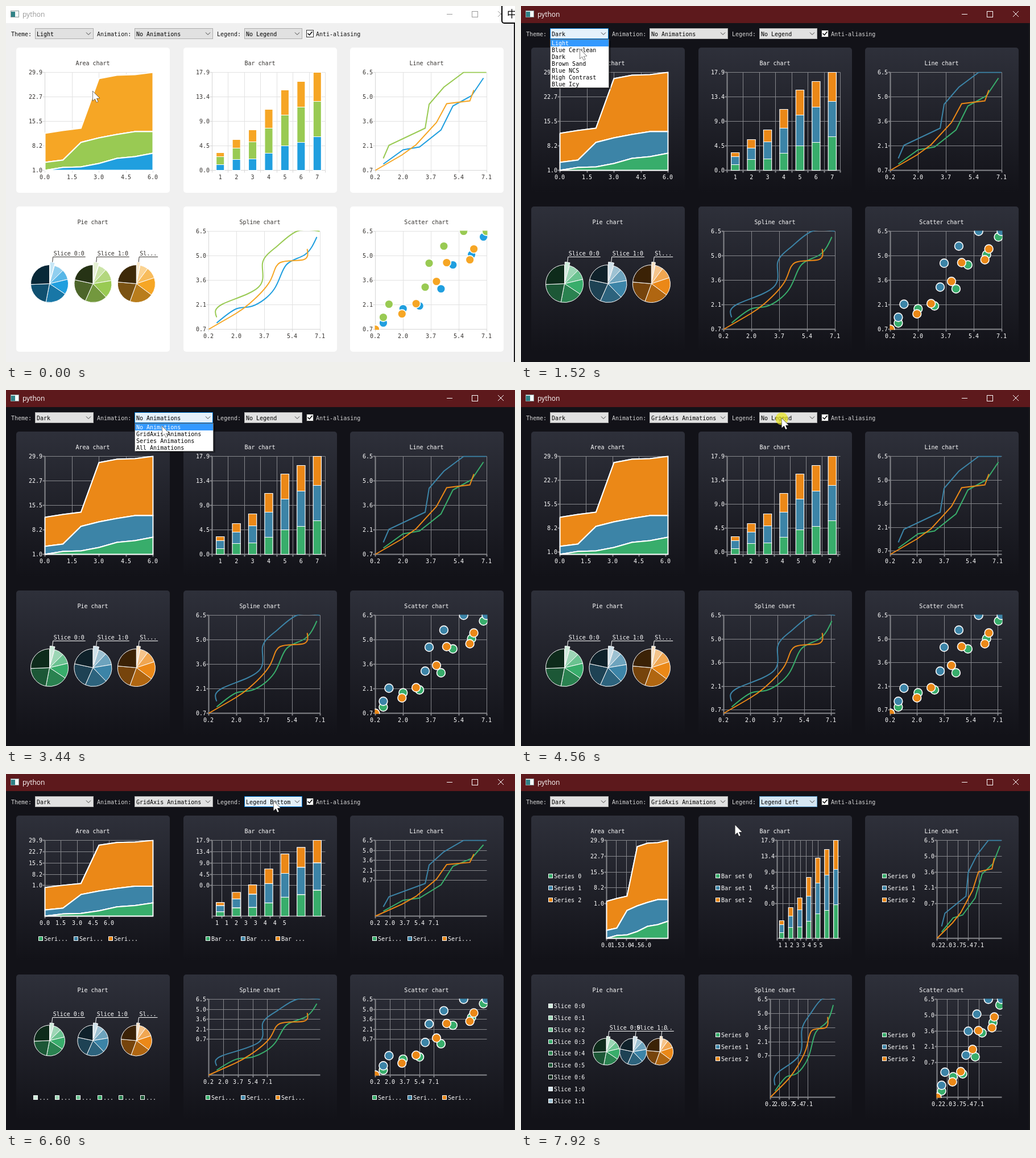
Recreate the animation shown at these times as an HTML page with a canvas. Size 895x625 px, loop 8000 ms.

```html
<!DOCTYPE html>
<html lang="en">
<head>
<meta charset="utf-8">
<title>Chart themes</title>
<style>
html, body { margin: 0; width: 100%; height: 100%; overflow: hidden; }
canvas { display: block; width: 895px; height: 625px; }
</style>
</head>
<body>
<canvas id="stage" width="895" height="625"></canvas>
<script>
const g = document.getElementById('stage').getContext('2d');
const LOOP = 8000;
const MONO = '10px "DejaVu Sans Mono", monospace';

const LIGHT = { win: '#f0f0f0', ui: '#101010', top: '#fff', bottom: '#fff', label: '#35322f',
  axis: '#d6d6d6', grid: '#e2e2e2', axisW: 1, series: ['#209fdf', '#99ca53', '#f6a625'] };
const CERULEAN = { win: '#40434a', ui: '#d6d6d6', top: '#056189', bottom: '#101a33', label: '#fff',
  axis: '#d6d6d6', grid: '#84a2b0', axisW: 2, series: ['#c7e85b', '#1cb54f', '#5cbf9b'] };
const DARK = { win: '#121218', ui: '#d6d6d6', top: '#2e303a', bottom: '#121218', label: '#fff',
  axis: '#86878c', grid: '#86878c', axisW: 2, series: ['#38ad6b', '#3c84a7', '#eb8817'] };
const THEMES = [LIGHT, CERULEAN, DARK];

const COMBOS = [
  { label: 'Theme:', lx: 9, x: 51, w: 103, steps: [[0, 0], [960, 2], [1840, 1], [2760, 2]],
    hot: [[440, 1000], [1240, 1860], [2300, 2800]], open: [[540, 960], [1340, 1840], [2400, 2760]],
    items: ['Light', 'Blue Cerulean', 'Dark', 'Brown Sand', 'Blue NCS', 'High Contrast', 'Blue Icy'] },
  { label: 'Animation:', lx: 160, x: 226, w: 138, steps: [[0, 0], [3945, 1]],
    hot: [[3220, 3950]], open: [[3340, 3945]],
    items: ['No Animations', 'GridAxis Animations', 'Series Animations', 'All Animations'] },
  { label: 'Legend:', lx: 371, x: 419, w: 102, steps: [[0, 0], [6398, 2], [7692, 3]],
    hot: [[5200, 7700]], open: [[5800, 6398], [7080, 7692]],
    items: ['No Legend', 'Legend Top', 'Legend Bottom', 'Legend Left', 'Legend Right'] }
];
const ACTIVATE = 480;
const CLICKS = [480, 940, 1300, 1800, 2360, 2720, 3300, 3880, 4560, 5760, 6260, 7040, 7620];

// time, x, y of the pointer
const PATH = [[0, 152, 149], [120, 152, 149], [440, 104, 50], [560, 104, 50], [860, 106, 88],
  [980, 106, 88], [1240, 104, 50], [1380, 104, 50], [1520, 103, 75], [1860, 104, 77],
  [2300, 106, 50], [2420, 106, 50], [2620, 108, 88], [2800, 108, 88], [3220, 274, 50],
  [3340, 274, 50], [3440, 274, 63], [3800, 276, 76], [3950, 276, 76], [4440, 458, 49],
  [5180, 458, 49], [5280, 470, 57], [5580, 470, 57], [5600, 470, 47], [5820, 470, 47],
  [6080, 472, 87], [6360, 472, 87], [6560, 470, 47], [7120, 470, 47], [7400, 470, 100],
  [7680, 470, 100], [7880, 376, 89], [8000, 376, 89]];

// start of each axis animation and the delay per chart
const ZOOMS = [[3945, [0, 0, 47, 0, 47, 47]], [6398, [0, 0, 32, 0, 32, 32]], [7692, [0, 0, 0, 0, 35, 0]]];

// heights on a plot 172 high
const AREA = [[0, 5, 6, 12, 21, 24, 30], [14, 18, 49, 57, 63, 68, 68], [65, 70, 74, 161, 167, 168, 172]];
const BARS = [[10, 19, 20, 30, 43, 49, 59], [14, 20, 30, 44, 54, 62, 62], [7, 15, 21, 33, 44, 45, 51]];
// points on a plot of 197 by 172, y downwards
const LINES = [
  [[14, 161], [49, 136], [78, 131], [116, 101], [137, 59], [170, 41], [191, 10]],
  [[14, 151], [24, 128], [88, 98], [95, 56], [121, 26], [156, 0], [196, 0]],
  [[0, 172], [47, 145], [72, 127], [108, 88], [126, 55], [167, 50], [174, 31]]];

const XY_X = ['0.2', '2.0', '3.7', '5.4', '7.1'], XY_Y = ['6.5', '5.0', '3.6', '2.1', '0.7'];
const CHARTS = [
  { name: 'Area', left: 50.5, w: 190, draw: area, xs: ['0.0', '1.5', '3.0', '4.5', '6.0'], ys: ['29.9', '22.7', '15.5', '8.2', '1.0'] },
  { name: 'Bar', left: 50.5, w: 199, draw: bars, ys: ['17.9', '13.4', '9.0', '4.5', '0.0'] },
  { name: 'Line', left: 44.5, w: 196, draw: lines, xs: XY_X, ys: XY_Y },
  { name: 'Pie' },
  { name: 'Spline', left: 44.5, w: 196, draw: splines, xs: XY_X, ys: XY_Y },
  { name: 'Scatter', left: 44.5, w: 196, draw: scatter, xs: XY_X, ys: XY_Y }
];

let theme, now, legend;

const inside = ([a, b], t = now) => t >= a && t < b;
const stepAt = (steps, t) => steps.filter(s => s[0] <= t).pop()[1];

function text(s, x, y, color, align = 'left', font = MONO) {
  g.font = font;
  g.fillStyle = color;
  g.textAlign = align;
  g.fillText(s, x, y + 4);
}

function box(x, y, w, h, fill, stroke) {
  g.fillStyle = fill;
  g.fillRect(x, y, w, h);
  if (!stroke) return;
  g.strokeStyle = stroke;
  g.lineWidth = 1;
  g.strokeRect(x + .5, y + .5, w - 1, h - 1);
}

function path(points, color, width = 1) {
  g.beginPath();
  points.forEach(([x, y]) => g.lineTo(x, y));
  g.strokeStyle = color;
  g.lineWidth = width;
  g.stroke();
}

function pointer(t) {
  const i = Math.max(1, PATH.findIndex(p => p[0] > t));
  const [t0, x0, y0] = PATH[i - 1], [t1, x1, y1] = PATH[i];
  const k = Math.max(0, (t - t0) / (t1 - t0));
  return [x0 + (x1 - x0) * k, y0 + (y1 - y0) * k];
}

function zoom(i) {
  const last = ZOOMS.filter(z => z[0] <= now).pop();
  if (!last) return 1;
  const k = Math.min(1, Math.max(0, (now - last[0] - last[1][i]) / 1000));
  return 1 - (1 - k) ** 4;
}

function axes(c, x, y, w, h, s) {
  const cells = c.xs ? 4 : 7;
  const { grid, axis, axisW, label } = theme;
  for (let i = 0; i <= 4; i++) {
    const ty = Math.round(y + h * s * i / 4 - .5) + .5;
    path([[x, ty], [x + w, ty]], grid);
    path([[x - 4, ty], [x, ty]], axis, axisW);
    text(c.ys[i], x - 4.5, ty - .5, label, 'right');
  }
  for (let i = 0; i <= cells; i++) {
    const tx = Math.round(x + w * s * i / cells - .5) + .5;
    path([[tx, y], [tx, y + h]], grid);
    path([[tx, y + h], [tx, y + h + 4]], axis, axisW);
    if (c.xs) text(c.xs[i], tx - .5, y + h + 11.5, label, 'center');
    else {
      const pos = (i + .5) * s;
      if (pos < 7) text(Math.floor(pos) + 1, x + w * pos / 7, y + h + 11.5, label, 'center');
    }
  }
  path([[x, y], [x, y + h], [x + w, y + h]], axis, axisW);
}

function area(x, y, w, h) {
  const edge = row => row.map((v, i) => [x + w * i / 6, y + h * (1 - v / 172)]);
  [2, 1, 0].forEach(k => {
    const low = k ? edge(AREA[k - 1]) : [[x, y + h], [x + w, y + h]];
    const poly = [...edge(AREA[k]), ...low.reverse()];
    path([...poly, poly[0]], '#fff', 2);
    g.fillStyle = theme.series[k];
    g.fill();
    g.stroke();
  });
}

function bars(x, y, w, h) {
  const bw = w / 14;
  for (let i = 0; i < 7; i++) {
    let base = y + h;
    BARS.forEach((row, k) => {
      const bh = row[i] * h / 172;
      base -= bh;
      g.fillStyle = theme.series[k];
      g.strokeStyle = '#fff';
      g.lineWidth = 1.2;
      g.beginPath();
      g.rect(x + w * (i + .5) / 7 - bw / 2, base, bw, bh);
      g.fill();
      g.stroke();
    });
  }
}

const place = (pts, x, y, w, h) => pts.map(p => [x + p[0] * w / 197, y + p[1] * h / 172]);

function lines(...r) {
  LINES.forEach((pts, k) => path(place(pts, ...r), theme.series[k], 2));
}

// first control values of a natural cubic through p
function controls(p) {
  const n = p.length - 1, c = [], d = [];
  for (let i = 0; i < n; i++) {
    const end = i === n - 1;
    const rhs = !i ? p[0] + 2 * p[1] : end ? (8 * p[i] + p[n]) / 2 : 4 * p[i] + 2 * p[i + 1];
    const b = (!i ? 2 : end ? 3.5 : 4) - (i ? d[i - 1] : 0);
    d[i] = 1 / b;
    c[i] = (rhs - (i ? c[i - 1] : 0)) / b;
  }
  for (let i = n - 2; i >= 0; i--) c[i] -= d[i] * c[i + 1];
  return c;
}

function splines(...r) {
  LINES.forEach((pts, k) => {
    const p = place(pts, ...r), n = p.length - 1;
    const [cx, cy] = [0, 1].map(a => controls(p.map(q => q[a])));
    const second = (c, i, a) => i === n - 1 ? (p[n][a] + c[i]) / 2 : 2 * p[i + 1][a] - c[i + 1];
    g.beginPath();
    g.moveTo(...p[0]);
    for (let i = 0; i < n; i++)
      g.bezierCurveTo(cx[i], cy[i], second(cx, i, 0), second(cy, i, 1), ...p[i + 1]);
    g.strokeStyle = theme.series[k];
    g.lineWidth = 2;
    g.stroke();
  });
}

function scatter(...r) {
  LINES.forEach((pts, k) => place(pts, ...r).forEach(([x, y]) => {
    g.beginPath();
    g.arc(x, y, 7.4, 0, 7);
    g.fillStyle = theme.series[k];
    g.fill();
    g.strokeStyle = '#fff';
    g.lineWidth = 1.6;
    g.stroke();
  }));
}

// white to the series colour to black
function sliceColor(k, i) {
  const pos = (i + 1) / 8, hex = theme.series[k];
  const rgb = [1, 3, 5].map(j => {
    const v = parseInt(hex.substr(j, 2), 16);
    return Math.round(pos < .5 ? 255 + (v - 255) * pos * 2 : v * (2 - pos * 2));
  });
  return `rgb(${rgb})`;
}

function pies() {
  const [x0, dx, cy, r] = legend === 3 ? [150, 47, 487.5, 23.5] : legend === 2 ? [76.5, 76.4, 468, 27] : [76.5, 76.4, 487.5, 33];
  BARS.forEach((row, k) => {
    const cx = x0 + dx * k, sum = row.reduce((a, b) => a + b);
    let a = -Math.PI / 2;
    row.forEach((v, i) => {
      const next = a + v / sum * 2 * Math.PI, mid = (a + next) / 2, out = i ? 0 : r * .15;
      const px = cx + Math.cos(mid) * out, py = cy + Math.sin(mid) * out;
      g.beginPath();
      g.moveTo(px, py);
      g.arc(px, py, r, a, next);
      g.closePath();
      g.fillStyle = sliceColor(k, i);
      g.fill();
      g.strokeStyle = '#fff';
      g.lineWidth = 1;
      g.stroke();
      a = next;
    });
    const half = row[0] / sum * Math.PI, ax = cx + Math.sin(half) * r * 1.15;
    const top = cy - r * 1.15, bar = Math.round(top - 9.5) + .5;
    const s = k < 2 ? `Slice ${k}:0` : legend === 3 ? '...' : 'Sl...';
    path([[ax, top], [ax + 1, bar], [ax + 4 + s.length * 6, bar]], theme.label);
    text(s, ax + 2, bar - 6.5, theme.label);
  });
}

function legendItem(x, y, color, s) {
  box(x, y - 4, 8, 8, color, '#fff');
  text(s, x + 10, y, theme.label);
}

function drawLegend(c, px, py) {
  const pie = c.name === 'Pie', word = c.name === 'Bar' ? 'Bar set' : 'Series';
  if (legend === 2) {
    const n = pie ? 6 : 3;
    for (let i = 0; i < n; i++)
      legendItem(Math.round(px + (pie ? 30 + 37.6 * i : 39 + 61.5 * i)), py + 216,
        pie ? sliceColor(0, i) : theme.series[i], pie ? '...' : word.slice(0, 4) + '...');
  } else if (legend === 3) {
    for (let i = 0; i < (pie ? 9 : 3); i++) {
      const k = Math.floor(i / 7);
      legendItem(px + 30, Math.round(py + (pie ? 55 : 106) + 20.85 * i),
        pie ? sliceColor(k, i % 7) : theme.series[i], pie ? `Slice ${k}:${i % 7}` : `${word} ${i}`);
    }
  }
}

function chart(c, i) {
  const px = [18, 312, 605][i % 3], py = i < 3 ? 73 : 352;
  const fill = g.createLinearGradient(0, py, 0, py + 255);
  fill.addColorStop(0, theme.top);
  fill.addColorStop(1, theme.bottom);
  g.fillStyle = fill;
  g.beginPath();
  g.roundRect(px, py, 270, 255, 5);
  g.fill();
  text(c.name + ' chart', px + 134.5, py + 27, theme.label, 'center');
  if (!c.draw) pies();
  else {
    const shift = legend === 3 ? (c.name === 'Bar' ? 88 : 82) : 0;
    const r = [px + c.left + shift, py + 43.5, c.w - shift, legend === 2 ? 133 : 172];
    axes(c, ...r, zoom(i));
    g.save();
    g.beginPath();
    g.rect(r[0] - 1, r[1] - 1, r[2] + 2, r[3] + 2);
    g.clip();
    c.draw(...r);
    g.restore();
  }
  drawLegend(c, px, py);
}

function titleBar() {
  const active = now >= ACTIVATE, ink = active ? '#fff' : '#999';
  box(0, 0, 895, 30, active ? '#5d191c' : '#fff');
  box(8, 8, 15, 12, '#f4f8f8', '#8a9a9c');
  box(9, 10, 7, 9, '#2f8287');
  text('python', 29, 15, ink, 'left', '12px "Open Sans", sans-serif');
  path([[775, 14.5], [785, 14.5]], ink);
  g.strokeRect(819.5, 9.5, 10, 10);
  path([[865, 9], [875, 19]], ink);
  path([[875, 9], [865, 19]], ink);
  if (active) return;
  g.fillStyle = '#fff';
  g.strokeStyle = '#000';
  g.lineWidth = 2;
  g.beginPath();
  g.roundRect(872, -6, 40, 36, 4);
  g.fill();
  g.stroke();
  text('中', 881, 16, '#000', 'left', '17px "Noto Sans CJK SC", "Noto Sans CJK", sans-serif');
}

function combo(c, clicking) {
  const hot = c.hot.some(h => inside(h));
  const cooling = c.hot.some(h => inside([h[1], h[1] + 280]));
  const fill = hot ? (clicking ? '#cce4f7' : '#e5f1fb') : cooling ? '#d5e6f2' : '#e1e1e1';
  text(c.label, c.lx, 49, theme.ui);
  box(c.x, 39, c.w, 19, fill, hot ? '#0078d7' : cooling ? '#5a9fd0' : '#adadad');
  text(c.items[stepAt(c.steps, now)], c.x + 3, 49, '#000');
  const ax = c.x + c.w - 9;
  path([[ax - 4, 46.5], [ax, 50.5], [ax + 4, 46.5]], '#404040');
}

function dropDown(c) {
  if (!c.open.some(o => inside(o))) return;
  const y = pointer(now - 80)[1], n = c.items.length;
  const sel = y < 58 ? stepAt(c.steps, now) : Math.min(n - 1, Math.floor((y - 58.5) / 12));
  box(c.x + 3, 61, c.w + 1, n * 12 + 1, 'rgba(0,0,0,.35)');
  box(c.x, 58, c.w + 1, n * 12 + 2, '#fff', '#646464');
  c.items.forEach((s, i) => {
    const on = i === Math.max(0, sel);
    if (on) box(c.x + 1, 59 + i * 12, c.w - 1, 12, '#3399ff');
    text(s, c.x + 3, 65 + i * 12, on ? '#fff' : '#000');
  });
}

function drawPointer(clicking) {
  const [x, y] = pointer(now);
  if (clicking) {
    g.fillStyle = 'rgba(236,232,20,.68)';
    g.beginPath();
    g.arc(x + .5, y + 1.5, 11, 0, 7);
    g.fill();
  }
  const p = [[0, 0], [0, 17], [4, 13.3], [6.8, 19.5], [9.3, 18.4], [6.6, 12.4], [12, 12.2], [0, 0]];
  path(p.map(q => [x + .5 + q[0], y + .5 + q[1]]), '#000');
  g.fillStyle = '#fff';
  g.fill();
}

function draw(t) {
  now = t;
  theme = THEMES[stepAt(COMBOS[0].steps, t)];
  legend = stepAt(COMBOS[2].steps, t);
  const clicking = CLICKS.some(c => inside([c - 60, c + 60]));
  box(0, 0, 895, 625, theme.win);
  box(893, 30, 2, 595, '#1b1b1d');
  titleBar();
  CHARTS.forEach(chart);
  COMBOS.forEach(c => combo(c, clicking));
  box(528, 42, 13, 13, '#fff', '#333');
  path([[530.5, 48], [533.5, 51], [538.5, 45]], '#000', 1.5);
  text('Anti-aliasing', 545, 49, theme.ui);
  COMBOS.forEach(dropDown);
  drawPointer(clicking);
}

const start = performance.now();
function tick() {
  draw((performance.now() - start) % LOOP);
  requestAnimationFrame(tick);
}
tick();
</script>
</body>
</html>
```
